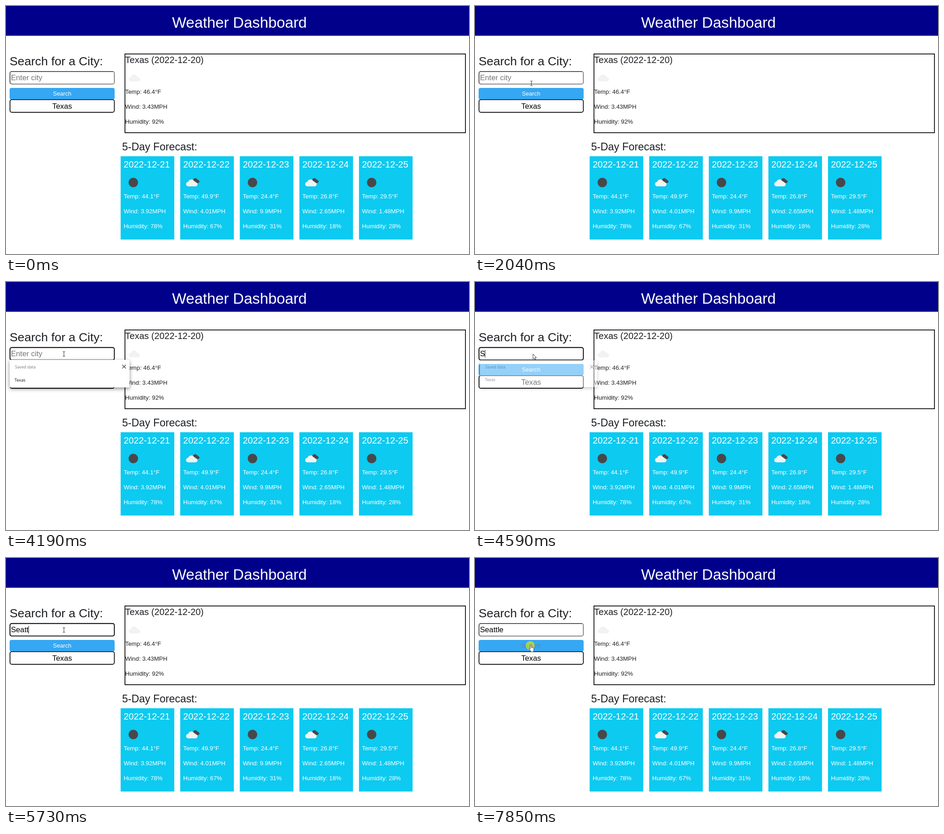
Animation of 1023 by 548 pixels, one loop 7.99 s. Source, as an HTML page:

```html
<!DOCTYPE html>
<html lang="en">
<head>
<meta charset="utf-8">
<title>Weather Dashboard</title>
<style>
  html, body { margin: 0; width: 100%; height: 100%; overflow: hidden; background: #fff; }
  svg { display: block; width: 1023px; height: 548px; font-family: "Liberation Sans", Arial, sans-serif; fill: #1c1f23; }
  .ui { font-family: "Open Sans", "Noto Sans", sans-serif; }
  .panel { filter: drop-shadow(0 3px 4px rgba(0, 0, 0, .45)); }
</style>
</head>
<body>
<svg id="stage" viewBox="0 0 1023 548" xmlns="http://www.w3.org/2000/svg"></svg>
<script>
const LOOP = 7990, STEP = 65, BLINK = 533;
const stage = document.getElementById('stage');

const text = (x, y, size, label, extra = '') =>
  `<text x="${x}" y="${y}" font-size="${size}" ${extra}>${label}</text>`;

const readings = (x, y, [temp, wind, humidity]) =>
  [`Temp: ${temp}°F`, `Wind: ${wind}MPH`, `Humidity: ${humidity}%`]
    .map((label, i) => text(x, y + i * 33.2, 13.34, label)).join('');

const cloud = (x, y, scale, color) =>
  `<path transform="translate(${x} ${y}) scale(${scale})" fill="${color}"
    d="M5 16a5 5 0 0 1-.3-10A7 7 0 0 1 17.600 4.500A5 5 0 0 1 21.500 7.200A4.500 4.500 0 0 1 21.500 16Z"/>`;

const moon = x => `<circle cx="${x + 28}" cy="390" r="10.500" fill="#48484a"/>`;
const brokenClouds = x =>
  cloud(x + 25.500, 380, .68, '#48484a') + cloud(x + 13, 382.500, 1, '#f2f2f2');

const forecast = [
  [21, moon, 44.1, 3.92, 78],
  [22, brokenClouds, 49.9, 4.01, 67],
  [23, moon, 24.4, 9.9, 31],
  [24, brokenClouds, 26.8, 2.65, 18],
  [25, moon, 29.5, 1.48, 28],
];

const card = ([day, icon, ...values], i) => {
  const x = 253.3 + i * 131.65;
  return `<rect x="${x}" y="332" width="118.500" height="184" fill="#0dcaf0"/>
    <g fill="#fff">${text(x + 6.6, 357, 20, '2022-12-' + day)}${readings(x + 6.6, 424.7, values)}</g>
    ${icon(x)}`;
};

stage.innerHTML = `
  <defs>
    <linearGradient id="inset" x1="0" y1="0" x2="1" y2="1">
      <stop offset=".5" stop-color="#222"/><stop offset=".5" stop-color="#606060"/>
    </linearGradient>
  </defs>
  <rect width="1023" height="65.700" fill="#00008b"/>
  ${text(367, 47.5, 33.35, 'Weather Dashboard', 'fill="#fff"')}
  ${text(8, 130.8, 26.7, 'Search for a City:')}

  <rect x="262.800" y="106" width="752.400" height="174" fill="none" stroke="#000" stroke-width="1.700"/>
  ${text(263.3, 126, 20, 'Texas (2022-12-20)')}
  ${cloud(271.2, 150.5, 1, '#f2f2f2')}
  ${readings(263.3, 193.7, [46.4, 3.43, 92])}
  ${text(256.5, 319.3, 23.35, '5-Day Forecast:')}
  ${forecast.map(card).join('')}

  <rect id="field" x="8.800" y="144.800" width="230.600" height="27.600" rx="4" fill="#fff"/>
  ${text(11, 164, 16.67, '', 'id="entry"')}
  <rect id="caret" y="150" width="1" height="17" fill="#000"/>
  <rect x="8" y="181" width="232" height="25.500" rx="4" fill="#36a7f2"/>
  ${text(124, 197.8, 12.8, 'Search', 'id="search" text-anchor="middle"')}
  <rect x="8.800" y="207" width="230.600" height="27.800" rx="4" fill="#fff" stroke="#000" stroke-width="1.700"/>
  ${text(124, 227.2, 16.67, 'Texas', 'text-anchor="middle" fill="#000"')}

  <g id="popup" class="ui">
    <rect class="panel" x="8" y="172" width="265" height="61" rx="2" fill="#fff"/>
    ${text(20, 190.7, 8.9, 'Saved data', 'fill="#767676"')}
    ${text(19, 219.6, 9.3, 'Texas', 'fill="#111"')}
    <path d="M257 183l8 8m0-8l-8 8" stroke="#333" stroke-width="1.100"/>
  </g>

  <circle id="press" r="10" fill="#f0f000" fill-opacity=".58"/>
  <g id="pointer">
    <path id="arrow" d="M0 0v11.200l2.600-2.300 1.800 3.900 1.800-.8-1.800-3.800h3.500Z" fill="#fff" stroke="#222" stroke-width=".9"/>
    <path id="beam" d="M-2.500-5.200h1.700l.8.600.8-.6h1.700M-2.500 5.200h1.700l.8-.6.8.6h1.700M0-4.600v9.200" fill="none" stroke="#222" stroke-width="1"/>
    <path id="hand" d="M-1 1a1.200 1.200 0 0 1 2.400 0v4.500l4 .9q1.600.4 1.600 2v2.600q0 1.600-1 3v1.500h-5.500v-1.300l-3.600-5q-.7-1.500.6-1.700l1.500 1.300Z" fill="#fff" stroke="#222" stroke-width=".8"/>
  </g>`;

const el = Object.fromEntries([...stage.querySelectorAll('[id]')].map(node => [node.id, node]));
const show = (node, on) => node.setAttribute('visibility', on ? 'visible' : 'hidden');
const between = (t, from, to) => t >= from && t < to;

// Each move is a list of [time, x, y]; the pointer rests between moves.
const moves = [
  [[710, 958, 536], [840, 740, 465], [970, 510, 395], [1100, 387, 336], [1165, 356, 310]],
  [[1380, 326, 322], [1510, 241, 276], [1640, 185, 240], [1770, 148, 215], [1900, 128, 193],
   [2095, 123, 160], [2190, 123, 159]],
  [[2930, 125, 159], [3125, 128, 159]],
  [[7120, 128, 162], [7315, 128, 188], [7445, 125, 202], [7640, 123, 196], [7850, 123, 192]],
];

const keys = [[2590, 0], [4520, 1], [4850, 2], [5250, 3], [5530, 4], [5730, 5], [5860, 6], [5990, 7]];

function pointerAt(t) {
  const move = moves.findLast(m => t >= m[0][0]);
  if (!move) return null;
  const start = move[0][0];
  const time = t >= move.at(-1)[0] ? t : start + Math.floor((t - start) / STEP) * STEP;
  const next = move.findIndex(p => p[0] > time);
  if (next < 0) return move.at(-1).slice(1);
  const [t0, x0, y0] = move[next - 1], [t1, x1, y1] = move[next];
  const k = (time - t0) / (t1 - t0);
  return [x0 + (x1 - x0) * k, y0 + (y1 - y0) * k];
}

function pointerKind(t, x, y) {
  if (between(t, 4520, 4720)) return 'arrow';
  const inColumn = between(x, 8, 240);
  if (inColumn && between(y, 144, 173)) return 'beam';
  if (inColumn && between(y, 181, 236)) return 'hand';
  return between(x, 257, 421) && between(y, 303, 320) ? 'beam' : 'arrow';
}

function drawPointer(t) {
  const at = pointerAt(t);
  const kind = at && pointerKind(t, ...at);
  for (const name of ['arrow', 'beam', 'hand']) show(el[name], name === kind);
  show(el.press, between(t, 2590, 2930) || t >= 7850);
  if (!at) return el.search.setAttribute('fill', '#fff');
  const [x, y] = at;
  el.pointer.setAttribute('transform', `translate(${x} ${y})`);
  el.press.setAttribute('cx', x - 1);
  el.press.setAttribute('cy', t < 7000 ? y - 1 : y + 1.5);
  const hovered = between(x, 8, 240) && between(y, 181, 206);
  el.search.setAttribute('fill', hovered ? '#6f7f8c' : '#fff');
}

function drawField(t) {
  const focused = between(t, 2590, 7850);
  const [since, count] = keys.findLast(k => t >= k[0]) || [0, 0];
  el.field.setAttribute('stroke', focused ? '#000' : 'url(#inset)');
  el.field.setAttribute('stroke-width', focused ? 1.9 : 1.5);
  el.entry.textContent = count ? 'Seattle'.slice(0, count) : 'Enter city';
  el.entry.setAttribute('fill', count ? '#000' : '#757575');
  el.caret.setAttribute('x', count ? 10.5 + el.entry.getComputedTextLength() : 11);
  show(el.caret, focused && Math.floor((t - since) / BLINK) % 2 === 0);
}

function drawPopup(t) {
  const opacity = between(t, 2590, 4520) ? 1 : [.85, .47, .12][Math.floor((t - 4520) / STEP)] || 0;
  const scale = 1 - .043 * (1 - opacity);
  el.popup.setAttribute('opacity', opacity);
  el.popup.setAttribute('transform', `translate(140.5 202.5) scale(${scale}) translate(-140.5 -202.5)`);
}

function render(t) {
  drawField(t);
  drawPopup(t);
  drawPointer(t);
}

const begin = performance.now();
function tick() {
  render((performance.now() - begin) % LOOP);
  requestAnimationFrame(tick);
}
tick();
</script>
</body>
</html>
```
